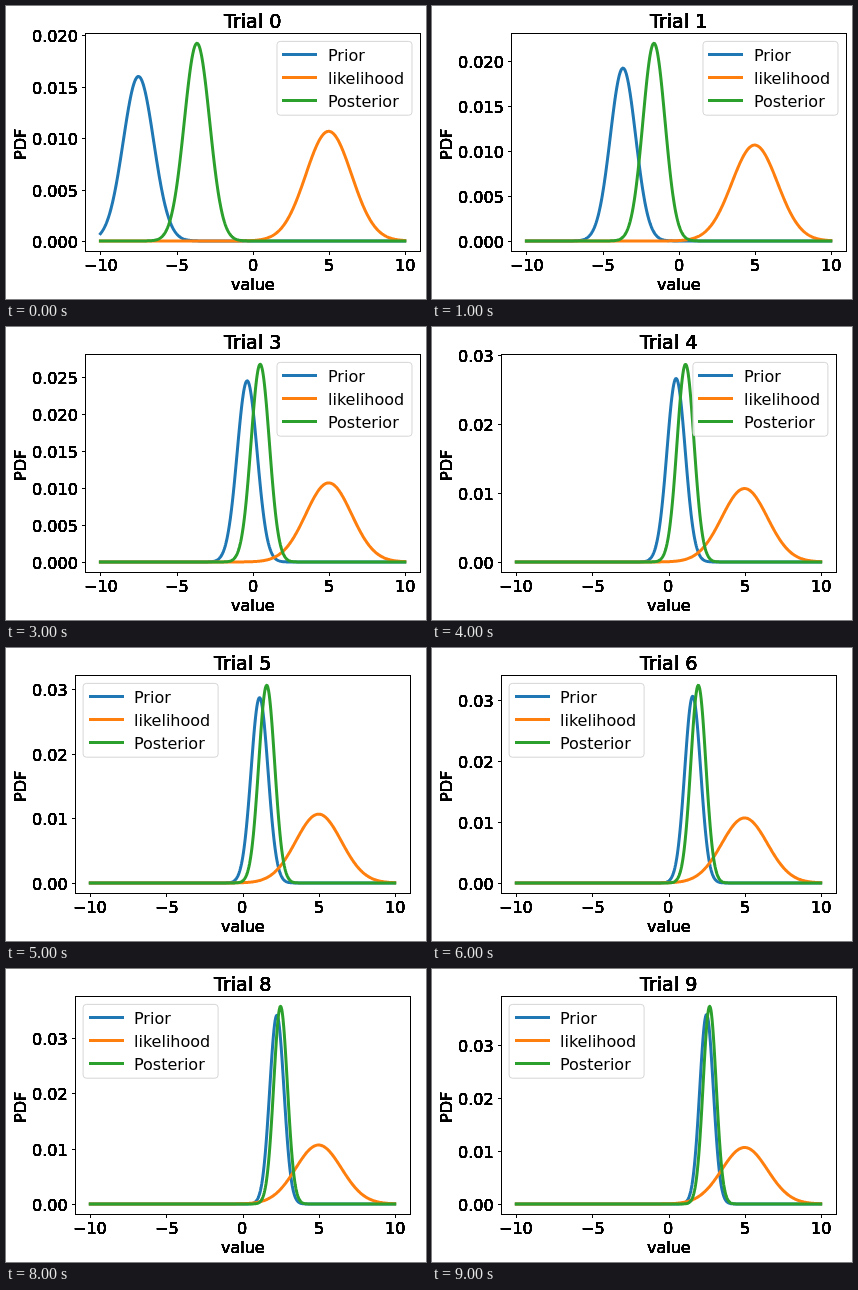
These frames come from a looping animation (420 px wide and 293 px high, 10 s). An HTML page with a canvas:

```html
<!DOCTYPE html>
<html lang="en">
<head>
<meta charset="utf-8">
<title>Bayesian update</title>
<style>
  html, body { margin: 0; width: 100%; height: 100%; overflow: hidden; background: #fff; }
  canvas { display: block; }
</style>
</head>
<body>
<canvas id="stage" width="420" height="293"></canvas>
<script>
const ctx = document.getElementById('stage').getContext('2d');
const TRIALS = 10, TRIAL_MS = 1000;
const POINTS = 500, DX = 20 / (POINTS - 1);
const AXES = { width: 334.8, top: 27.4, height: 217.44 };
const BOTTOM = AXES.top + AXES.height;
const ZERO_Y = BOTTOM - AXES.height / 22;
const UNIT_X = AXES.width / 22;
const LEGEND = { width: 135, height: 73.8, row: 23 };
const LIKELIHOOD = { mean: 5, precision: 1 / 2.25 };
const SERIES = [['Prior', '#1f77b4'], ['likelihood', '#ff7f0e'], ['Posterior', '#2ca02c']];

const snap = v => Math.floor(v + 0.5) + 0.5;
const peak = d => Math.sqrt(d.precision / (2 * Math.PI)) * DX;
const density = (d, x) => peak(d) * Math.exp(-d.precision * (x - d.mean) ** 2 / 2);

// Belief after n observations, starting from N(-7.5, 1)
function belief(n) {
  const precision = 1 + n * LIKELIHOOD.precision;
  return { mean: (-7.5 + n * LIKELIHOOD.precision * LIKELIHOOD.mean) / precision, precision };
}

// align: 0 left, 0.5 centre, 1 right
function text(str, x, y, align = 0, size = 16) {
  ctx.font = `${size}px "DejaVu Sans", sans-serif`;
  ctx.fillStyle = '#000';
  ctx.fillText(str, Math.round(x - ctx.measureText(str).width * align), y);
}

// Text around the axes has hard edges: repeated drawing saturates its antialiasing
function hardText(...args) {
  for (let i = 0; i < 10; i++) text(...args);
}

function line(x1, y1, x2, y2, color = '#000', width = 1, cap = 'butt') {
  ctx.strokeStyle = color;
  ctx.lineWidth = width;
  ctx.lineCap = cap;
  ctx.beginPath();
  ctx.moveTo(x1, y1);
  ctx.lineTo(x2, y2);
  ctx.stroke();
}

function curve(dist, color, toX, toY) {
  ctx.strokeStyle = color;
  ctx.lineWidth = 3;
  ctx.lineCap = 'square';
  ctx.lineJoin = 'round';
  ctx.beginPath();
  for (let i = 0; i < POINTS; i++) {
    const x = -10 + i * DX;
    ctx.lineTo(toX(x), toY(density(dist, x)));
  }
  ctx.stroke();
}

function legend(x, y) {
  ctx.beginPath();
  ctx.roundRect(x, y, LEGEND.width, LEGEND.height, 3.2);
  ctx.fillStyle = 'rgba(255,255,255,0.8)';
  ctx.fill();
  ctx.strokeStyle = 'rgba(204,204,204,0.8)';
  ctx.lineWidth = 1;
  ctx.stroke();
  SERIES.forEach(([name, color], i) => {
    const rowY = snap(y + 12.96 + i * LEGEND.row);
    line(snap(x + 6.4), rowY, snap(x + 38.4), rowY, color, 3, 'square');
    text(name, x + 51.2, rowY + 6.5);
  });
}

function plot(trial) {
  const dists = [belief(trial), LIKELIHOOD, belief(trial + 1)];
  const top = peak(dists[2]);
  const fine = top * 1.05 < 0.03;
  const step = fine ? 0.005 : 0.01;
  const left = fine ? 79.2 : 69.1, right = left + AXES.width;
  const toX = x => left + (x + 11) * UNIT_X;
  const toY = v => ZERO_Y - v / top * AXES.height / 1.1;

  dists.forEach((d, i) => curve(d, SERIES[i][1], toX, toY));

  ctx.strokeStyle = '#000';
  ctx.lineWidth = 1;
  ctx.lineJoin = 'miter';
  ctx.strokeRect(snap(left), snap(AXES.top), snap(right) - snap(left), snap(BOTTOM) - snap(AXES.top));

  for (let x = -10; x <= 10; x += 5) {
    const px = snap(toX(x));
    line(px, snap(BOTTOM), px, snap(BOTTOM) + 3.5);
    hardText(String(x).replace('-', '\u2212'), toX(x), 265, 0.5);
  }
  for (let i = 0; i * step < top * 1.05; i++) {
    const y = toY(i * step);
    line(snap(left) - 3.5, snap(y), snap(left), snap(y));
    hardText((i * step).toFixed(fine ? 3 : 2), left - 7, Math.round(y + 6) + 1, 1);
  }

  const middle = (left + right) / 2;
  hardText('Trial ' + trial, middle, 22, 0.5, 19.2);
  hardText('value', middle, 284, 0.5);
  ctx.save();
  ctx.translate(20, 138);
  ctx.rotate(-Math.PI / 2);
  hardText('PDF', 0, 0, 0.5);
  ctx.restore();

  legend(trial < 5 ? right - 8 - LEGEND.width : left + 8, AXES.top + 8);
}

function render() {
  ctx.fillStyle = '#fff';
  ctx.fillRect(0, 0, 420, 293);
  plot(Math.floor(performance.now() / TRIAL_MS) % TRIALS);
  requestAnimationFrame(render);
}
render();
</script>
</body>
</html>
```
